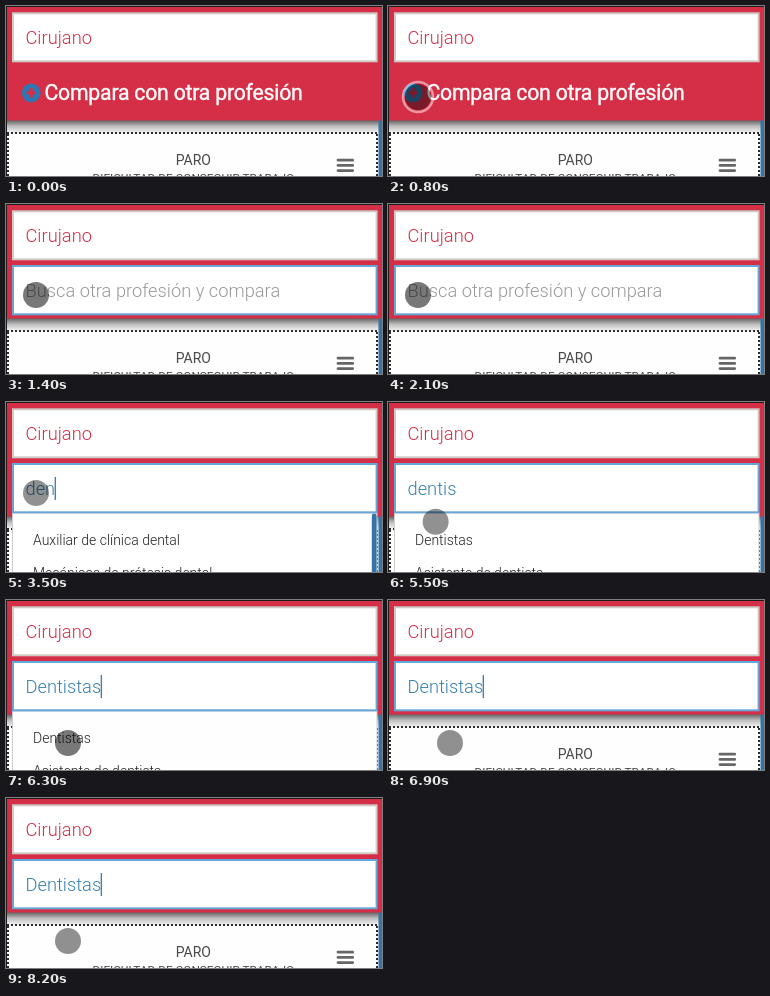
An HTML page for the animation above (8300 ms loop, 376 px wide and 170 px high).

```html
<!DOCTYPE html>
<html lang="es">
<head>
<meta charset="utf-8">
<title>Comparar profesiones</title>
<style>
  html, body { margin: 0; width: 100%; height: 100%; overflow: hidden; background: #fff; }
  svg { display: block; width: 376px; height: 170px; font-family: Roboto, "Open Sans", sans-serif; }
  .field { font-size: 18.3px; font-weight: 300; }
  .item { font-size: 14px; font-weight: 300; fill: #222; }
  .dots { stroke: #2b2b2b; stroke-width: 2; stroke-dasharray: 2 2; fill: none; }
</style>
</head>
<body>
<svg viewBox="0 0 376 170">
  <defs>
    <linearGradient id="shade" x1="0" y1="0" x2="0" y2="1">
      <stop offset="0" stop-color="#444" stop-opacity=".85"/>
      <stop offset=".5" stop-color="#444" stop-opacity=".3"/>
      <stop offset="1" stop-color="#444" stop-opacity="0"/>
    </linearGradient>
  </defs>

  <!-- page -->
  <rect width="376" height="170" fill="#f5f5f5"/>
  <rect x="2" y="127" width="369" height="43" fill="#fefefe"/>
  <path class="dots" d="M1 127H372M2 128V170M371 128V170"/>
  <g text-anchor="middle" fill="#4a4a4a">
    <text x="187.3" y="159" font-size="14">PARO</text>
    <text x="187.3" y="175.5" font-size="11.8">DIFICULTAD DE CONSEGUIR TRABAJO</text>
  </g>
  <path d="M332 154.2H346.7M332 159.4H346.7M332 164.6H346.7" stroke="#666" stroke-width="2.8" stroke-linecap="round"/>

  <!-- header -->
  <rect x="1" y="114" width="372" height="13" fill="url(#shade)"/>
  <rect x="372.5" y="114" width="3.5" height="56" fill="#3474a8"/>
  <rect width="376" height="114.5" fill="#d52e47"/>
  <path d="M0 .5H376M.5 0V170" stroke="#1c1c1c"/>
  <rect x="7" y="7.3" width="363.6" height="48" fill="#fff" stroke="#cfcac4" stroke-width="2"/>
  <text class="field" x="19.5" y="38" fill="#d52e47">Cirujano</text>

  <g id="link">
    <circle cx="25.2" cy="86.8" r="9.4" fill="#2d78b4"/>
    <path d="M20.5 86.8H29.9M25.2 82.1V91.5" stroke="#d52e47" stroke-width="3"/>
    <text x="38.5" y="94.3" font-size="21.2" letter-spacing="-.2" fill="#fff" stroke="#fff" stroke-width=".4">Compara con otra profesión</text>
  </g>

  <g id="list">
    <rect x="6.5" y="111" width="364.5" height="60" fill="#fff" stroke="#ccc"/>
    <text class="item" id="first" x="27" y="143"></text>
    <text class="item" id="second" x="27" y="176"></text>
    <rect id="bar" x="365.8" y="111.5" width="4.8" height="70" rx="2.4" fill="#3474a8"/>
  </g>

  <g id="search">
    <rect x="7" y="62" width="363.6" height="48.3" fill="#fff" stroke="#66a6d8" stroke-width="2"/>
    <text class="field" id="query" x="19.5" y="93"></text>
    <rect id="caret" y="75" width="1.2" height="23" fill="#2d6f9f"/>
  </g>

  <g id="touch">
    <circle id="ring" r="15" fill="none" stroke="#fff" stroke-width="2.5"/>
    <circle id="dot" r="13"/>
  </g>
</svg>
<script>
const LOOP = 8300, PICK = 6300;
const KEYS = [2700, 3100, 3500, 4000, 4400, 4700];
const el = id => document.getElementById(id);
const [link, list, first, second, bar, search, query, caret, touch, ring, dot] =
  ["link", "list", "first", "second", "bar", "search", "query", "caret", "touch", "ring", "dot"].map(el);

const ramp = (t, a, b) => Math.min(1, Math.max(0, (t - a) / (b - a)));
const ease = p => p * p * (3 - 2 * p);
const within = (t, a, b) => t >= a && t < b;
const set = (node, attrs) => { for (const k in attrs) node.setAttribute(k, attrs[k]); };
const write = (node, s) => { if (node.textContent !== s) node.textContent = s; };

function drawSearch(t) {
  const shown = ramp(t, 1100, 1400);
  set(link, { opacity: 1 - shown });
  set(search, { opacity: shown });

  const count = KEYS.filter(k => t >= k).length;
  const typed = t >= PICK ? "Dentistas" : "dentis".slice(0, count);
  write(query, typed || "Busca otra profesión y compara");
  set(query, { fill: typed ? "#347fae" : "#999" });

  const caretOn = within(t, 2300, 5200) || within(t, 5700, 6000) ||
    within(t, PICK, 7600) || t >= 8000;
  const width = typed ? query.getComputedTextLength() : 0;
  set(caret, { x: 19 + width, opacity: caretOn ? 1 : 0 });

  const narrow = count >= 5;
  write(first, narrow ? "Dentistas" : "Auxiliar de clínica dental");
  write(second, narrow ? "Asistente de dentista" : "Mecánicos de prótesis dental");
  set(bar, { opacity: narrow ? 0 : 1 });
  set(list, { opacity: count ? 1 - ramp(t, PICK, PICK + 200) : 0 });
}

function drawTouch(t) {
  const p = ease(ramp(t, 5100, 5850));
  const x = 30 + 32 * p, y = 91 + 52 * p;
  set(touch, { transform: `translate(${x} ${y})`, opacity: ramp(t, 300, 700) });

  // The dot darkens while the finger is down.
  const press = Math.max(ramp(t, 900, 1200) * (1 - ramp(t, 2300, 2600)),
    ramp(t, 6000, 6150) * (1 - ramp(t, 6300, 6500)));
  set(dot, { fill: "#000", "fill-opacity": 0.43 + 0.1 * press });
  set(ring, { opacity: 0.5 * ramp(t, 400, 700) * (1 - ramp(t, 1000, 1400)) });
}

function draw(t) {
  drawSearch(t);
  drawTouch(t);
}

const start = performance.now();
function tick() {
  draw((performance.now() - start) % LOOP);
  requestAnimationFrame(tick);
}
draw(0);
requestAnimationFrame(tick);
</script>
</body>
</html>
```
